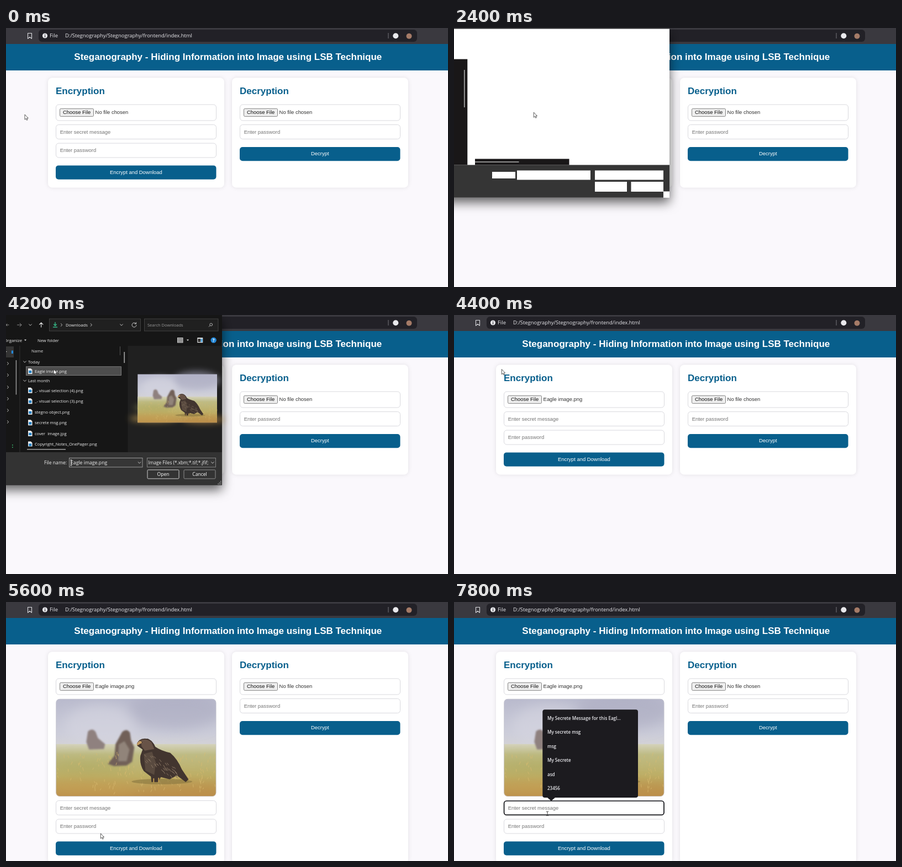
Animation of 800x470 px, one loop 8 s. Source, as an HTML page:

```html
<!DOCTYPE html>
<html lang="en">
<head>
<meta charset="utf-8">
<title>Hiding information in an image</title>
<style>
html, body { margin: 0; width: 100%; height: 100%; overflow: hidden; background: #faf8fc; }
svg { display: block; width: 800px; height: 470px; }
text { font-family: "Liberation Sans", Arial, sans-serif; font-size: 9.44px; white-space: pre; }
.ui { font-family: "Open Sans", "Noto Sans", sans-serif; }
.mid { text-anchor: middle; }
.bold { font-weight: 700; font-size: 17px; }
</style>
</head>
<body>
<svg id="stage" viewBox="0 0 800 470" xmlns="http://www.w3.org/2000/svg"></svg>
<script>
const LOOP = 8000, STEP = 200, SHIFT = 185;
const BLUE = '#085f8c';
const stage = document.getElementById('stage');

const rect = (x, y, w, h, fill, more = '') =>
  `<rect x="${x}" y="${y}" width="${w}" height="${h}" fill="${fill}" ${more}/>`;
const circle = (x, y, r, fill) => `<circle cx="${x}" cy="${y}" r="${r}" fill="${fill}"/>`;
const path = (d, fill, more = '') => `<path d="${d}" fill="${fill}" ${more}/>`;
const line = (d, color, width = 1) =>
  `<path d="${d}" fill="none" stroke="${color}" stroke-width="${width}" stroke-linecap="round" stroke-linejoin="round"/>`;
const label = (x, y, s, fill, more = '') => `<text x="${x}" y="${y}" fill="${fill}" ${more}>${s}</text>`;
const ui = (x, y, s, size, fill = '#f0f0f0', more = '') =>
  label(x, y, s, fill, `class="ui" style="font-size:${size}px" ${more}`);
const group = (id, body, more = '') => `<g id="${id}" ${more}>${body}</g>`;

// Small seeded random source for grass and feathers
function random(seed) {
  return () => (seed = (seed * 16807) % 2147483647) / 2147483647;
}

function photo() {
  const rnd = random(71);
  let grass = '', feathers = '';
  for (let i = 0; i < 150; i++) {
    const x = rnd() * 290, y = 102 + rnd() * 72, h = 2 + rnd() * 4;
    grass += `M${x.toFixed(1)} ${y.toFixed(1)}l${(rnd() * 4 - 2).toFixed(1)} ${-h.toFixed(1)}`;
  }
  for (let i = 0; i < 38; i++) {
    const u = rnd(), x = 160 + u * 58, y = 92 + u * 34 + rnd() * 22;
    feathers += `M${x.toFixed(1)} ${y.toFixed(1)}l3 ${(2 + rnd() * 3).toFixed(1)}`;
  }
  return rect(0, 0, 290, 177, 'url(#sky)') +
    `<g filter="url(#haze)">
      <ellipse cx="215" cy="22" rx="85" ry="34" fill="#a9a9c0" opacity=".55"/>
      <ellipse cx="80" cy="50" rx="65" ry="40" fill="#d4d5e0" opacity=".7"/>
    </g>` +
    rect(0, 82, 290, 95, 'url(#field)') +
    `<g filter="url(#haze)">
      <ellipse cx="60" cy="162" rx="90" ry="14" fill="#c7a052" opacity=".6"/>
      <ellipse cx="240" cy="166" rx="80" ry="14" fill="#bd8f48" opacity=".6"/>
      <ellipse cx="60" cy="122" rx="75" ry="12" fill="#a9a75d" opacity=".5"/>
    </g>
    <g filter="url(#soft)">` +
    path('M58 59Q66 52 72 60L76 71 89 82 87 91 60 92 55 78Z', '#8f817f') +
    path('M120 60Q128 53 134 61L136 75 142 88 138 114 128 121 105 122 94 118 106 103 108 82Z', '#716158') +
    path('M114 83L124 77 133 92 128 113 113 113Z', '#91847a') +
    '</g>' + line(grass, '#d8bb70', .7) +
    `<ellipse cx="192" cy="150" rx="55" ry="5" fill="#84713c" opacity=".55"/>` +
    path('M147 85L147 80 151 75Q158 70 168 73 176 77 180 87 190 94 207 98 220 109 228 128L240 146 235 151 219 139 206 146 190 142 185 151H173L172 141 159 131Q151 118 153 103L157 92Z', '#42352f') +
    path('M154 75Q165 71 173 79L178 91 161 94 155 86Z', '#685347') +
    path('M147 85L147 80 152 76 157 79 152 82Z', '#c39a61') +
    path('M159 100L174 96 181 116 178 138 162 130Z', '#594a3f') +
    line(feathers, '#8a7663', 1) +
    circle(156, 79, .8, '#191514') +
    line('M177 145v6M186 144v7', '#c09a50', 2);
}

function cursorArt() {
  return group('arrow', path('M0 0V9.2L2.1 7.3 3.5 10.3 5 9.6 3.6 6.7H6.3Z', '#fff', 'stroke="#333" stroke-width=".8"')) +
    group('beam', line('M-1.8 -4Q0 -4 0 -3V3Q0 4 1.8 4M1.8 -4Q0 -4 0 -3M0 3Q0 4 -1.8 4', '#333', .9));
}

function browserBar() {
  return rect(0, 0, 800, 29, '#3a393f') + rect(59, 3, 685, 22, '#222127', 'rx="6"') +
    line('M39.5 9.5H46.5V19.3L43 16.3 39.5 19.3Z', '#dcdce0', 1.1) +
    circle(70.5, 14, 4.6, '#e4e4e8') + rect(70, 13.3, 1.1, 3.4, '#222127') + rect(70, 11.2, 1.1, 1.2, '#222127') +
    ui(79, 17.4, 'File', 9.44, '#e8e8ec') +
    ui(107, 17.4, 'D:/Stegnography/Stegnography/frontend/index.html', 9.44, '#e8e8ec') +
    rect(691.5, 9, 1, 10, '#77767c') + circle(705.3, 14.3, 5, '#e9e9ec') + circle(729.5, 14.8, 5, '#a57b67');
}

const field = (x, y, h = 26) => rect(x + .5, y + .5, 290, h, '#fff', 'rx="5" stroke="#d9d9de"');
const input = (x, y, s) => field(x, y) + label(x + 7.7, y + 16.5, s, '#757575');
const button = (x, y, s) => rect(x, y, 290.5, 25.3, BLUE, 'rx="5"') +
  label(x + 145.3, y + 15.2, s, '#fff', 'class="mid"');
const chooser = (x, id) => field(x, 138.5, 29) +
  rect(x + 7.5, 146.4, 61, 14, '#efefef', `id="${id}Btn" rx="1.8" stroke="#767676" stroke-width=".9"`) +
  label(x + 13, 156.4, 'Choose File', '#111') +
  label(x + 71.6, 156.4, 'No file chosen', '#333', `id="${id}Name"`);

function webPage() {
  const card = (x, id) => rect(x, 90.5, 319, 199, '#fff', `id="${id}" rx="8" filter="url(#cardShadow)"`);
  return rect(0, 29, 800, 441, '#faf8fc') + rect(0, 29, 800, 48, BLUE) +
    label(401.8, 58.2, 'Steganography - Hiding Information into Image using LSB Technique', '#fff', 'class="bold mid"') +
    card(76, 'cardL') + card(409, 'cardR') +
    label(90, 120.2, 'Encryption', BLUE, 'class="bold"') + label(423, 120.2, 'Decryption', BLUE, 'class="bold"') +
    chooser(90, 'left') + chooser(423, 'right') +
    input(423, 175, 'Enter password') + button(423, 216, 'Decrypt') +
    group('preview', `<g clip-path="url(#photoClip)">${photo()}</g>` +
      rect(.4, .4, 289.4, 176.4, 'none', 'rx="7" stroke="#c8c8d0" stroke-width=".7"'), 'transform="translate(90.3 175.8)"') +
    group('form', input(90, 175, 'Enter secret message') + input(90, 208.6, 'Enter password') +
      button(90, 249.4, 'Encrypt and Download') +
      rect(90.6, 176, 289.4, 25.4, 'none', 'id="focus" rx="4.5" stroke="#111217" stroke-width="1.7"'));
}

function suggestions() {
  const rows = ['My Secrete Message for this Eagl...', 'My secrete msg', 'msg', 'My Secrete', 'asd', '23456'];
  return group('popup', rect(160.3, 195.3, 172.7, 159.8, '#1c1b1f', 'rx="4"') +
    path('M168.5 354.5H183.5L176 361Z', '#1c1b1f') +
    rows.map((s, i) => ui(169, 213.9 + i * 25.45, s, 8.05, '#ececf0', 'font-weight="600"')).join(''));
}

// Dialog before its contents are painted
function blankDialog() {
  const boxes = [[69, 261, 42, 12], [114, 258.5, 133, 17], [255, 258.5, 124, 17],
    [255, 279, 58, 18], [320.5, 279, 58.5, 18], [379, 296.5, 11, 11.5]];
  return group('blank', rect(-20, 0, 410, 307.5, '#343434', 'filter="url(#dialogShadow)"') +
    rect(0, 0, 390, 1.5, '#2b2b2d') + rect(0, 1.5, 390, 247, '#fff') +
    rect(0, 56.5, 24.3, 192, '#191718') + rect(18, 76, 1.6, 68, '#aaa') +
    rect(38, 237.5, 170.5, 11, '#191718') + rect(38, 242.3, 79.5, 1.6, '#aaa') +
    boxes.map(b => rect(...b, '#fff')).join(''));
}

function fileDialog() {
  const files = ['_- visual selection (4).png', '_- visual selection (3).png', 'stegno object.png',
    'secrete msg.png', 'cover  image.jpg', 'Copyright_Notes_OnePager.png'];
  const icon = y => path(`M40 ${y - 5}h5l2.5 2.5v7.5h-7.5Z`, '#f2f2f2') + rect(41.2, y - 1.2, 5, 4.6, '#1f7fc4');
  const file = (s, y) => icon(y) + ui(52, y + 2.8, s, 7.6);
  const down = (x, y, c = '#d8d8d8') => line(`M${x - 2.4} ${y - 1.2}L${x} ${y + 1.2} ${x + 2.4} ${y - 1.2}`, c, .9);
  const next = (x, y) => line(`M${x - 1.2} ${y - 2.3}L${x + 1.2} ${y} ${x - 1.2} ${y + 2.3}`, '#d8d8d8', .9);
  const caret = x => path(`M${x - 2} 44.6h4l-2 2.4Z`, '#ddd');
  const box = (x, y, w, h, c, fill, r = 0) => rect(x, y, w, h, fill, `rx="${r}" stroke="${c}" stroke-width=".9"`);

  const top = line('M5 18H0M0 18l2 -2M0 18l2 2', '#8b8b8b') +
    line('M20.5 18H28M25 15l3 3 -3 3', '#8b8b8b') + down(44, 18) +
    line('M63.7 22V14M60.5 17.2l3.2 -3.2 3.2 3.2', '#eee', 1.1) +
    box(78.5, 7, 165, 22, '#454545', '#202020') + box(250.5, 7, 133.5, 22, '#454545', '#202020') +
    line('M89 13.5V19M86.6 17l2.4 2.4 2.4 -2.4M85.5 22h7', '#35b887', 1.4) +
    next(100.5, 18) + ui(108, 20.8, 'Downloads', 7.65) + next(154.3, 18) + down(209, 18) +
    line('M235 15.4A4 4 0 1 0 236 18.6M235.6 13.6V16H233', '#ddd', .9) +
    ui(256, 20.8, 'Search Downloads', 7.5, '#9a9a9a') +
    line('M369.2 19.2L367.2 21.2M373.6 17.4A2.4 2.4 0 1 1 368.8 17.4A2.4 2.4 0 1 1 373.6 17.4', '#bbb', .9);

  const tools = ui(-3.5, 48.6, 'Organize', 7.8) + caret(35) + ui(57, 48.6, 'New folder', 7.6) +
    box(310.5, 41.5, 9.5, 8.5, '#ddd', '#777') + line('M311.5 44.3h7.5M311.5 47.2h7.5', '#ddd', .7) + caret(329) +
    rect(346.3, 41.2, 10, 9, '#eee') + rect(347.3, 43, 5, 6, '#333') + rect(352.6, 43, 3, 6, '#4aa3df') +
    circle(375.7, 45.6, 5.2, '#2488d8') + ui(375.7, 48.6, '?', 8, '#fff', 'font-weight="700" text-anchor="middle"');

  const side = rect(0, 57, 14, 20, '#343434') + rect(9.8, 64.5, 3.2, 5.5, '#2488d8') + line('M0 66.5h1', '#ddd') +
    [88, 109, 131, 152, 173, 194].map(y => next(3.5, y)).join('') +
    rect(17.7, 82, 1.5, 62.5, '#9a9a9a') + rect(24.5, 56, 1, 193, '#303030') +
    rect(11, 235, 1.6, 2, '#35a060') + rect(11, 239, 1.6, 2, '#35a060');

  const list = ui(46, 67.8, 'Name', 7.6, '#ddd') + rect(206, 57, .8, 16, '#666') + rect(213.3, 67, 1.8, 20, '#9a9a9a') +
    down(34, 85) + ui(40, 87.6, 'Today', 7.6) +
    rect(36.5, 93.7, 172, 15.8, '#4d4d4d', 'id="row" stroke="#8a8a8a" stroke-width=".8"') + file('Eagle image.png', 102) +
    down(34, 119.3) + ui(40, 121.9, 'Last month', 7.45) +
    `<g clip-path="url(#listClip)">${files.map((s, i) => file(s, 136.7 + i * 19.55)).join('')}</g>` +
    rect(38, 243, 70, 1.6, '#9a9a9a');

  const bottom = rect(0, 249, 391, 59.5, '#333') + ui(69, 270.9, 'File name:', 8.6) +
    box(114.5, 259.5, 132.5, 16.5, '#a5a5a5', '#363636') + down(241.5, 268) +
    box(255.5, 259.5, 124, 16.5, '#8a8a8a', '#363636') + ui(257.5, 270.9, 'Image Files (*.xbm;*.tif;*.jfif;', 8.25) + down(374, 268) +
    box(256, 281, 57, 16, '#e2e2e2', '#333', 1.5) + ui(284.5, 292.2, 'Open', 8.6, '#fff', 'text-anchor="middle"') +
    box(322, 281, 57, 16, '#9a9a9a', '#333', 1.5) + ui(350.5, 292.2, 'Cancel', 8.6, '#fff', 'text-anchor="middle"') +
    [[388, 302], [388, 304.5], [388, 307], [385.7, 304.5], [385.7, 307], [383.4, 307]]
      .map(([x, y]) => rect(x, y - 1, 1.3, 1.3, '#bbb')).join('');

  const picked = group('picked', `<g transform="translate(238.3 107.5) scale(.4955)">${photo()}</g>` +
    ui(117, 271, 'Eagle image.png', 8.7) + line('M116.6 263h2.4M117.8 263v10M116.6 273h2.4', '#ddd', .9));

  return group('dialog', rect(-20, 0, 411, 308.5, '#191919', 'filter="url(#dialogShadow)"') +
    rect(220.5, 56, 170.5, 193, '#202020') + top + tools + side + list + bottom + picked);
}

const defs = `<defs>
  <linearGradient id="sky" x2="0" y2="1"><stop stop-color="#b9bacd"/><stop offset=".35" stop-color="#cbccd9"/><stop offset=".55" stop-color="#d8d6d5"/></linearGradient>
  <linearGradient id="field" x2="0" y2="1"><stop stop-color="#d4d2bb"/><stop offset=".2" stop-color="#bebb84"/><stop offset=".62" stop-color="#bdae65"/><stop offset="1" stop-color="#bb8d4a"/></linearGradient>
  <filter id="haze" x="-50%" y="-50%" width="200%" height="200%"><feGaussianBlur stdDeviation="11"/></filter>
  <filter id="soft"><feGaussianBlur stdDeviation="1.8"/></filter>
  <filter id="cardShadow" x="-10%" y="-10%" width="120%" height="120%"><feDropShadow dx="0" dy="0" stdDeviation="3.5" flood-color="#000" flood-opacity=".1"/></filter>
  <filter id="dialogShadow" x="-15%" y="-15%" width="130%" height="135%"><feDropShadow dx="0" dy="9" stdDeviation="10" flood-color="#000" flood-opacity=".62"/></filter>
  <clipPath id="photoClip"><rect width="290" height="177" rx="7"/></clipPath>
  <clipPath id="listClip"><rect x="26" y="126" width="186" height="112.5"/></clipPath>
</defs>`;

stage.innerHTML = defs + webPage() + browserBar() + suggestions() + blankDialog() + fileDialog() +
  group('cursor', cursorArt());

const el = {};
stage.querySelectorAll('[id]').forEach(node => { el[node.id] = node; });
const show = (id, on) => { el[id].style.display = on ? '' : 'none'; };
const set = (id, name, value) => el[id].setAttribute(name, value);

// Pointer route: time, x, y
const route = [[0, 34, 157], [600, 80, 163], [800, 80, 163], [1600, 144.3, 153], [3000, 144.3, 153],
  [3800, 86.3, 98.5], [4600, 86.3, 98.5], [5600, 171.3, 420], [6200, 178, 379],
  [6800, 178, 379], [7200, 169, 384], [LOOP, 169, 384]];

function pointer(t) {
  const i = route.findIndex((p, k) => k > 0 && t <= p[0]);
  const [t0, x0, y0] = route[i - 1], [t1, x1, y1] = route[i];
  const u = (t - t0) / (t1 - t0), e = u * u * (3 - 2 * u);
  return [x0 + (x1 - x0) * e, y0 + (y1 - y0) * e];
}

function render(time) {
  const t = Math.floor(time / STEP) * STEP;
  const chosen = t >= 4400, loaded = t >= 4600;
  const [x, y] = pointer(t);
  const overButton = x > 97 && x < 159 && y > 146 && y < 161 && t < 2200;
  const overInput = loaded && ((y > 360 && y < 387) || (y > 393 && y < 419));

  set('cursor', 'transform', `translate(${x} ${y})`);
  show('arrow', !overInput);
  show('beam', overInput);
  set('leftBtn', 'fill', overButton ? '#dedede' : '#efefef');
  el.leftName.textContent = chosen ? 'Eagle image.png' : 'No file chosen';

  show('preview', loaded);
  set('form', 'transform', `translate(0 ${loaded ? SHIFT : 0})`);
  for (const id of ['cardL', 'cardR']) set(id, 'height', loaded ? 199 + SHIFT : 199);

  show('blank', t >= 2200 && t < 2600);
  show('dialog', t >= 2600 && !chosen);
  show('row', t >= 3600);
  set('row', 'opacity', t >= 3800 ? 1 : .6);
  show('picked', t >= 3800);
  show('focus', t >= 7600);
  show('popup', t >= 7800);
}

function tick(now) {
  render(now % LOOP);
  requestAnimationFrame(tick);
}
render(0);
requestAnimationFrame(tick);
</script>
</body>
</html>
```
